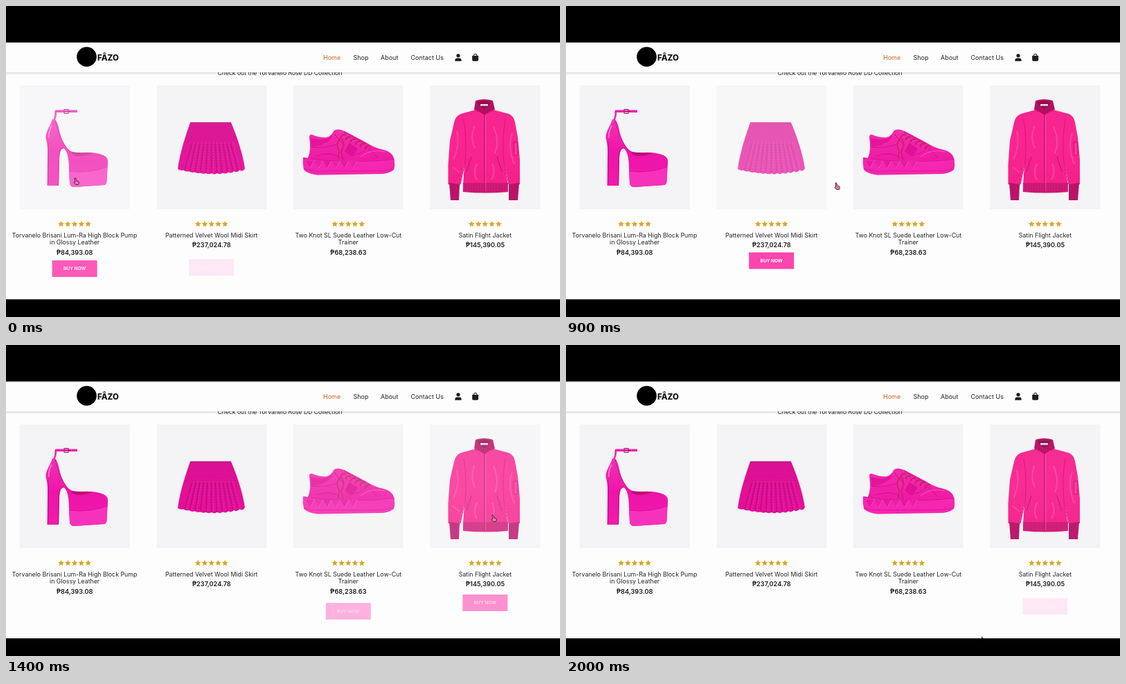
Write an HTML page with a canvas that moves like this. It is 800 by 450 pixels and loops after 2100 ms.

```html
<!DOCTYPE html>
<html lang="en">
<head>
<meta charset="utf-8">
<title>Pink collection</title>
<style>
html, body { margin: 0; width: 100%; height: 100%; overflow: hidden; background: #000; }
canvas { display: block; width: 800px; height: 450px; }
</style>
</head>
<body>
<canvas id="stage" width="800" height="450"></canvas>
<script>
const ctx = document.getElementById('stage').getContext('2d');
const LOOP = 2100, STEP = 100, FADE = 250;
const FONT = 'Inter, "Open Sans", sans-serif';
const PANEL = '#f4f3f5', PAGE = '#fefdfe';

// on/off: when the pointer enters and leaves the card, in ms
const cards = [
  { lines: ['Torvanelo Brisani Lum-Ra High Block Pump', 'in Glossy Leather'], price: '₱84,393.08', draw: drawPump, on: -150, off: 540 },
  { lines: ['Patterned Velvet Wool Midi Skirt'], price: '₱237,024.78', draw: drawSkirt, on: 540, off: 950, lastOff: -150 },
  { lines: ['Two Knot SL Suede Leather Low-Cut', 'Trainer'], price: '₱68,238.63', draw: drawSneaker, on: 950, off: 1315 },
  { lines: ['Satin Flight Jacket'], price: '₱145,390.05', draw: drawJacket, on: 1315, off: 1850 }
];

// time, x, y
const pointer = [
  [0, 101, 254], [400, 127, 253], [900, 391, 261], [1100, 474, 260],
  [1400, 704, 251], [1800, 639, 388], [2000, 600, 426], [2100, 590, 440]
];

const clamp = v => Math.max(0, Math.min(1, v));
const lerp = (a, b, k) => a + (b - a) * k;

// CSS "ease": cubic-bezier(.25, .1, .25, 1)
function ease(x) {
  x = clamp(x);
  let lo = 0, hi = 1, u = x;
  for (let i = 0; i < 24; i++) {
    u = (lo + hi) / 2;
    const bx = .75 * u * (1 - u) + u * u * u;
    if (bx < x) lo = u; else hi = u;
  }
  return .3 * u * (1 - u) * (1 - u) + 3 * u * u * (1 - u) + u * u * u;
}

function hover(card, t) {
  if (t < card.on) {
    return card.lastOff === undefined ? 0 : 1 - ease((t - card.lastOff) / FADE);
  }
  return t < card.off ? ease((t - card.on) / FADE) : 1 - ease((t - card.off) / FADE);
}

function pointerAt(t) {
  let i = 0;
  while (i < pointer.length - 2 && t >= pointer[i + 1][0]) i++;
  const a = pointer[i], b = pointer[i + 1], k = (t - a[0]) / (b[0] - a[0]);
  return [lerp(a[1], b[1], k), lerp(a[2], b[2], k)];
}

function rect(x, y, w, h, color) {
  ctx.fillStyle = color;
  ctx.fillRect(x, y, w, h);
}

function shape(d, color) {
  ctx.fillStyle = color;
  ctx.fill(new Path2D(d));
}

function line(d, color, width = 1) {
  ctx.strokeStyle = color;
  ctx.lineWidth = width;
  ctx.stroke(new Path2D(d));
}

function disc(x, y, r, color) {
  ctx.fillStyle = color;
  ctx.beginPath();
  ctx.arc(x, y, r, 0, Math.PI * 2);
  ctx.fill();
}

function text(s, x, y, size, weight, color, align = 'center') {
  ctx.font = `${weight} ${size}px ${FONT}`;
  ctx.textAlign = align;
  ctx.fillStyle = color;
  ctx.fillText(s, x, y);
}

function fade(y0, y1, ...colors) {
  const g = ctx.createLinearGradient(0, y0, 0, y1);
  colors.forEach((c, i) => g.addColorStop(i / (colors.length - 1), c));
  return g;
}

function star(x, y, r) {
  ctx.beginPath();
  for (let i = 0; i < 10; i++) {
    const a = -Math.PI / 2 + i * Math.PI / 5, q = i % 2 ? r * .48 : r;
    ctx.lineTo(x + q * Math.cos(a), y + q * Math.sin(a));
  }
  ctx.closePath();
  ctx.fillStyle = ctx.strokeStyle = '#d9a522';
  ctx.lineWidth = .4;
  ctx.fill();
  ctx.stroke();
}

function drawPump() {
  line('M67.5 168 Q73 160 71.5 152', '#ee2bad', 2.6);
  line('M71 152.3 L103 152.3', '#ee25aa', 3.6);
  ctx.strokeStyle = '#8e2468';
  ctx.lineWidth = 1;
  ctx.strokeRect(84, 149.5, 6, 6);
  line('M89 152.5 L93 152.5', '#8e2468');
  shape('M67 164 C65 172 57 181 57.5 191 Q60 199 60 210 L59.5 260 L76 260 L77 218 Q78 206 83 206 C89 209 91 222 91 236 L92 257 Q93 262 99 262 L142 259 Q145.5 258 145.5 253 L147 228 Q148 219 141 216 Q127 211 112 212 Q98 213 92 209 C84 203 79 190 77 180 Q75 169 71 164 Z',
    fade(164, 262, '#f233b4', '#ee14a9', '#f01bad'));
  shape('M94 211.5 Q110 212 125 213 Q116 217 103 217 Q96 216 94 211.5 Z', '#b90f79');
  shape('M91 239 Q118 243 146 233 L145.5 253 Q145.5 258 142 259 L99 262 Q93 262 92 257 Z', '#f632ba');
  line('M91 239 Q118 243 146 233', '#d90c99', .8);
  line('M71 166 C75 180 79 196 91 210', '#c91590', 1);
  line('M75.5 259 L76.5 218 Q77 206 83 205.5', '#b71482', 1.2);
  line('M61 195 Q62 220 61 258', '#c90e90', 1);
  line('M66 173 Q61 182 62 191', '#fb7ed4', 1.6);
}

function drawSkirt() {
  const base = new Path2D();
  base.moveTo(266, 168.5);
  base.lineTo(325, 168.5);
  base.bezierCurveTo(333, 188, 342, 213, 345, 235);
  for (let i = 0; i < 12; i++) {
    const x = 345 - (i + 1) * 97 / 12;
    const y = 236 + 6 * Math.sin(Math.PI * (i + 1) / 12);
    base.quadraticCurveTo(x + 5, y + 3, x, y);
  }
  base.bezierCurveTo(251, 212, 260, 186, 266, 168.5);
  ctx.fillStyle = fade(169, 243, '#dc1293', '#e50f9a');
  ctx.fill(base);
  ctx.save();
  ctx.clip(base);
  ctx.setLineDash([1.5, 1.5]);
  for (let y = 172; y < 200; y += 3.5) line(`M250 ${y} L344 ${y}`, 'rgba(170,10,110,.35)', 1);
  for (let i = 1; i < 12; i++) {
    const k = i / 12, top = lerp(263, 330, k), end = lerp(248, 345, k);
    ctx.setLineDash([]);
    line(`M${top} 199 L${end} 244`, 'rgba(160,8,105,.5)', 1.5);
    ctx.setLineDash([2, 2]);
    line(`M${top + 3} 197 L${end + 3} 243`, 'rgba(235,120,185,.4)', .8);
  }
  ctx.restore();
  line('M266 169 L325 169', '#b60f78', 1);
}

function drawSneaker() {
  shape('M438 190 Q438 184 444 187 Q455 191 463 190 Q470 188 473 181 Q477 176 489 181 L521 198 Q531 205 545 208 Q559 211 561 224 L550 231 L431 231 Q441 212 439 200 Z',
    fade(178, 230, '#f52cac', '#ed18a2'));
  shape('M429 219 Q450 223 478 223 Q520 225 560 221 Q562.5 230 560 237 Q553 243 540 243 L450 244.5 Q436 243 430 237 Q428 228 429 219 Z', '#f526b1');
  line('M430 235.5 Q440 239 455 239 L540 238.5 Q552 238.5 560 234', '#d9179a', .9);
  line('M430 220 Q455 224 480 224 Q525 226 560 221.5', '#cf1191', .9);
  for (let i = 0; i < 6; i++) {
    const x = 433 + i * 12.5;
    shape(`M${x} 224 L${x + 6} 235 L${x + 12} 224 Z`, i % 2 ? '#ea20a6' : '#e31b9f');
    line(`M${x + 6} 235 L${x + 12} 224`, '#f955c2', .7);
  }
  shape('M440 191 Q452 195 464 192 L472 187 Q467 201 441 204 Z', '#e2159b');
  line('M441 204 Q463 207 480 199 M447 217 Q470 210 482 219 M495 215 Q512 217 522 205 Q531 211 536 219', '#cd1190', .9);
  shape('M489 211 L496 198 L508 207 L500 218 Z', '#df1195');
  line('M512 218 Q528 206 547 211', '#fa55bd', 1);
  line('M474 185 Q481 194 489 201 M488 182 L519 199', '#c4107f', 1);
  for (let i = 0; i < 6; i++) {
    const x = 483 + i * 7, y = 187 + i * 3.2;
    line(`M${x} ${y + 4} Q${x + 3} ${y - 3} ${x + 8} ${y}`, '#c2225f', 1.8);
  }
  line('M484 191 Q474 199 481 209 L480 222 M485 191 Q490 203 484 211 L487 223', '#c2225f', 1.4);
}

function drawJacket() {
  shape('M679 150 L657 156 Q649 159 647 169 L641 195 L638.5 230 L638.5 258 L655 261 L662 228 L660 260 L725 260 L720 228 L727 261 L742 258 L742 222 L739 190 L735 168 Q733 159 726 156 L703 150 Z',
    fade(150, 262, '#f6258f', '#f82591', '#f42089'));
  shape('M678 137 Q690 133 703 137 L706 150 Q697 153 691 158 Q684 153 676 150 Z', '#b41060');
  shape('M681 139 Q691 136 700 139 Q697 146 691 149 Q684 146 681 139 Z', '#8d104f');
  rect(685, 142, 11, 2.5, '#f2dce9');
  shape('M660 256 L725 256 L725 269 Q692 272 660 269 Z', '#d01a77');
  shape('M640 256 L655 258 L654 281 L642 281 Z', '#b9136a');
  shape('M726 258 L741 256 L739 281 L726 281 Z', '#b9136a');
  line('M691 157 L691 269', '#bd1068', 1.1);
  line('M692.5 158 L692.5 268', '#fb66b2', .6);
  line('M661 164 Q666 195 663 226 L656 258 M721 164 Q716 195 719 226 L726 258', '#d5167c', 1);
  line('M672 218 L665 240 M709 218 L716 240', '#ce1474', 1.2);
  ctx.lineWidth = .9;
  ctx.strokeStyle = '#d2147a';
  ctx.strokeRect(733, 197, 6, 19);
  line('M736 199 L736 215', '#fd70ba', .8);
  line('M651 181 Q656 200 646 222 M645 233 L655 241 M731 184 Q724 203 734 229 M676 174 Q670 191 677 206 M704 175 Q713 195 706 213 M680 228 Q674 242 680 252 M702 228 Q708 241 701 251', 'rgba(255,110,180,.38)', 2.2);
  for (let x = 664; x < 724; x += 4) line(`M${x} 258 L${x} 269`, 'rgba(150,8,85,.25)', .7);
}

function drawCard(card, i, t) {
  const x = 99.1 + i * 197.6, k = hover(card, t);
  const drop = (card.lines.length - 1) * 10.3;
  rect(x - 79.5, 115, 159, 179, PANEL);
  card.draw();
  // hovering makes the picture translucent
  ctx.globalAlpha = .29 * k;
  rect(x - 79.5, 115, 159, 179, PAGE);
  ctx.globalAlpha = 1;

  for (let s = -2; s <= 2; s++) star(x + s * 9.75, 315.6, 4.1);
  card.lines.forEach((s, n) => text(s, x, 334.6 + n * 10.3, 8.8, 400, '#252525'));
  text(card.price, x, 349.2 + drop, 9.2, 600, '#1d1d1f');

  if (k > .005) {
    const y = 356.5 + drop + 11 * (1 - k);
    ctx.globalAlpha = k;
    rect(x - 32.5, y, 65, 24, '#fd45ae');
    text('BUY NOW', x, y + 14.4, 6.6, 700, '#fff');
    ctx.globalAlpha = 1;
  }
}

function drawHeader() {
  text('Check out the Torvanelo Rose DD Collection', 395.5, 99.6, 8.6, 400, '#252525');
  rect(0, 96, 800, 4, fade(96, 100, 'rgba(0,0,0,.13)', 'rgba(0,0,0,0)'));
  rect(0, 52, 800, 44, PAGE);
  disc(116.5, 73.5, 14.3, '#000');
  text('FÂZO', 132, 79, 11.5, 800, '#111', 'left');
  text('Home', 458, 78.4, 9, 400, '#cf6426', 'left');
  text('Shop', 501.5, 78.4, 9, 400, '#222', 'left');
  text('About', 541, 78.4, 9, 400, '#222', 'left');
  text('Contact Us', 584.5, 78.4, 9, 400, '#222', 'left');
  disc(653, 71.8, 2.6, '#1c1c1c');
  shape('M648.3 79.8 Q648 75.4 651.5 75.4 L654.5 75.4 Q658 75.4 657.7 79.8 Z', '#1c1c1c');
  shape('M673.2 72 L682.2 72 L682.2 78 Q682 79.7 680.4 79.7 L675 79.7 Q673.3 79.7 673.2 78 Z', '#1c1c1c');
  line('M675.5 74 L675.5 71.5 Q675.7 69.5 677.7 69.5 Q679.7 69.5 679.9 71.5 L679.9 74', '#1c1c1c', 1.1);
}

function drawPointer(t) {
  const [x, y] = pointerAt(t);
  ctx.save();
  ctx.translate(x + .5, y);
  if (t < 1900) {
    const hand = 'M-2.5 -5 Q-1 -6 -.5 -4 L0 -1 L2.5 -.5 Q4 0 3.8 2 L3 4.5 L-1 4.5 L-3.5 1.5 Q-3.3 .3 -1.8 1 Z';
    shape(hand, '#e879ae');
    line(hand, '#40242f', .9);
  } else {
    shape('M-.5 -5 L4 1 L1 1 L-.5 4 Z', '#6d4a3a');
  }
  ctx.restore();
}

function draw(now) {
  const t = Math.floor((now % LOOP) / STEP) * STEP;
  rect(0, 0, 800, 450, PAGE);
  cards.forEach((card, i) => drawCard(card, i, t));
  drawHeader();
  drawPointer(t);
  rect(0, 0, 800, 52.8, '#000');
  rect(0, 424.4, 800, 26, '#000');
}

let start;
function tick(now) {
  if (start === undefined) start = now;
  draw(Math.max(0, now - start));
  requestAnimationFrame(tick);
}
draw(0);
requestAnimationFrame(tick);
</script>
</body>
</html>
```
